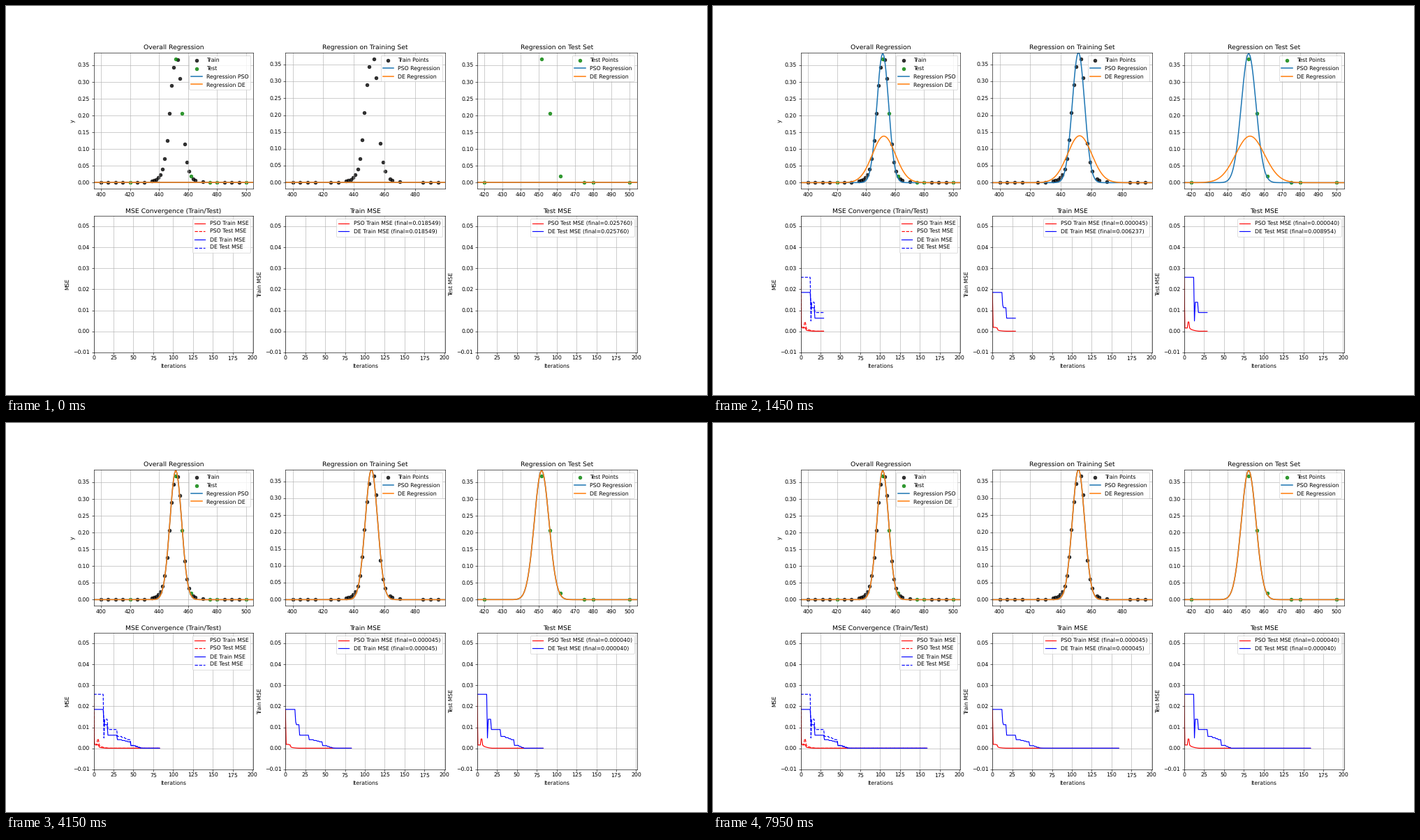
A matplotlib script that plays this animation: 1004x558 px, repeating every 8 s.

```python
import numpy as np
import matplotlib.pyplot as plt
from matplotlib.animation import FuncAnimation

W, H, DPI = 1004, 558, 55.8
FRAMES, INTERVAL = 160, 50
plt.rcParams["text.hinting"] = "none"

# Eckerle4 transmittance data, in units of 1e-4
x = np.concatenate([np.arange(400, 435, 5),
                    435 + 1.5 * np.arange(21),
                    np.arange(470, 501, 5)])
y = 1e-4 * np.array([
    1.6, 1.7, 2.4, 3.1, 4.9, 8.7, 17.4, 46.4, 65.9, 97.3, 149, 237.3, 401.7, 712.6,
    1264.5, 2073.4, 2902.4, 3445.6, 3698, 3668.5, 3106.7, 2078.2, 1164.4, 616.8,
    337.2, 194, 117.8, 74.4, 22.7, 8.8, 4.6, 2.3, 1.6, 1.1, 0.7])
test = np.isin(x, [420, 451.5, 456, 462, 475, 480, 500])
train = ~test


def bump(x, centre, width, peak):
    return peak * np.exp(-0.5 * ((x - centre) / width) ** 2)


def least_squares(fit, steps=20):
    """Gauss-Newton fit of the bump to the training points."""
    fit = np.array(fit)
    for _ in range(steps):
        centre, width, peak = fit
        d = (x[train] - centre) / width
        model = bump(x[train], *fit)
        slopes = np.stack([model * d / width, model * d ** 2 / width, model / peak], axis=1)
        fit = fit + np.linalg.lstsq(slopes, y[train] - model, rcond=None)[0]
    return fit


BEST = least_squares([451.4, 4.1, 0.385])


def held(steps, t):
    """Value of the latest step reached by iteration t."""
    return steps[max(start for start in steps if start <= t)]


def pso_fit(t):
    """The swarm overshoots in height at constant area, then settles."""
    peak = np.interp(t, [0, 1, 4, 5, 6, 7, 9, 13, 19],
                     [0, 0.29, 0.29, 0.54, 0.54, 0.47, 0.445, 0.42, BEST[2]])
    centre = 450 if t < 5 else BEST[0]
    return centre, BEST[1] * BEST[2] / max(peak, 0.1), peak


DE_GUESSES = {0: (450, 5, 0), 13: (445, 9.5, 0.258), 14: (457, 6, 0.12)}
DE_PEAKS = {18: 0.139, 30: 0.185, 36: 0.195, 40: 0.203, 43: 0.212,
            47: 0.28, 53: 0.3, 56: 0.325, 59: 0.379}


def de_fit(t):
    """Early guesses, then a bump that narrows as it grows and settles."""
    if t < min(DE_PEAKS):
        return held(DE_GUESSES, t)
    peak = held(DE_PEAKS, t)
    missing = max(DE_PEAKS.values()) - peak
    fit = np.array([451.85 + 1.9 * missing, 3.8 + 17.3 * missing, peak])
    return BEST + (fit - BEST) * 0.75 ** max(0, t - max(DE_PEAKS))


def mse(fit, mask):
    return np.mean((y[mask] - bump(x[mask], *fit)) ** 2)


iters = np.arange(FRAMES)
grid_x = np.linspace(390, 510, 800)
METHODS = ("PSO", "DE")
SETS = {"Train MSE": train, "Test MSE": test}
found = {"PSO": [pso_fit(t) for t in iters], "DE": [de_fit(t) for t in iters]}
history = {(m, s): np.array([mse(fit, mask) for fit in found[m]])
           for m in METHODS for s, mask in SETS.items()}

fig, axes = plt.subplots(2, 3, figsize=((W + 1e-6) / DPI, (H + 1e-6) / DPI), dpi=DPI)
dots, fits, errors = [], [], []


def add_dots(ax, mask, color, label):
    dots.append(ax.scatter(x[mask], y[mask], color=color, alpha=0.8, label=label))


def add_fits(ax, title, label):
    ax.set_title(title)
    for method in METHODS:
        line, = ax.plot([], [], lw=2, label=label.format(method))
        fits.append((line, method))


def add_error(ax, key, style, label):
    line, = ax.plot([], [], style, label=label)
    errors.append((line, key))


def final_label(key, t):
    return f"{key[0]} {key[1]} (final={history[key][t]:.6f})"


add_dots(axes[0, 0], train, "black", "Train")
add_dots(axes[0, 0], test, "green", "Test")
add_dots(axes[0, 1], train, "black", "Train Points")
add_dots(axes[0, 2], test, "green", "Test Points")
add_fits(axes[0, 0], "Overall Regression", "Regression {}")
add_fits(axes[0, 1], "Regression on Training Set", "{} Regression")
add_fits(axes[0, 2], "Regression on Test Set", "{} Regression")
axes[0, 0].set_ylabel("y")

for method, color in zip(METHODS, "rb"):
    for name, ax, style in zip(SETS, axes[1, 1:], ("-", "--")):
        key = method, name
        add_error(axes[1, 0], key, color + style, f"{method} {name}")
        add_error(ax, key, color + "-", final_label(key, 0))

for ax, title, ylabel in zip(axes[1], ("MSE Convergence (Train/Test)", *SETS),
                             ("MSE", *SETS)):
    ax.set(title=title, xlabel="Iterations", ylabel=ylabel,
           xlim=(0, 201), ylim=(-0.01, 0.055))

for ax in axes.flat:
    ax.grid(True)
legends = [ax.legend(loc="upper right") for ax in axes.flat]


def show(artists, visible):
    for artist in artists:
        artist.set_visible(visible)


# Paint everything that lies below the moving lines once, as a backdrop
front = legends + [s for ax in axes.flat for s in ax.spines.values()]
back = dots + [a for ax in axes.flat for a in (ax.xaxis, ax.yaxis, ax.title, ax.patch)]
show(front, False)
fig.canvas.draw()
backdrop = np.asarray(fig.canvas.buffer_rgba()).copy()
show(front, True)
show(back, False)
fig.figimage(backdrop, origin="upper", zorder=-1)


def update(t):
    for line, method in fits:
        line.set_data(grid_x, bump(grid_x, *found[method][t]))
    for line, key in errors:
        line.set_data(iters[:t + 1], history[key][:t + 1])
    for name, legend in zip(SETS, legends[4:]):
        for method, text in zip(METHODS, legend.get_texts()):
            text.set_text(final_label((method, name), t))
    return [line for line, _ in fits + errors] + legends


anim = FuncAnimation(fig, update, frames=FRAMES, interval=INTERVAL, repeat=True)
plt.show()
```
